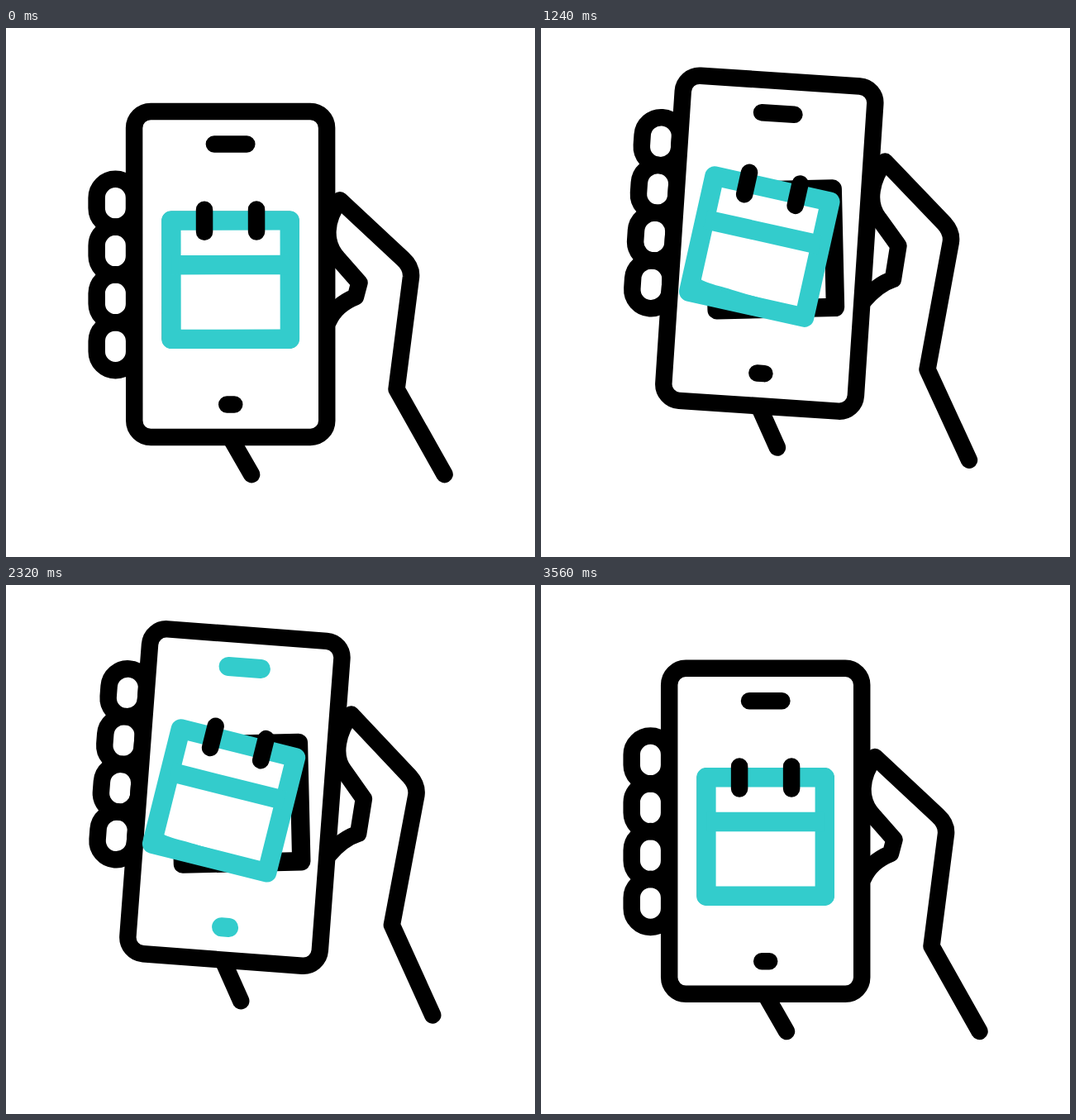
An HTML page without scripts that plays this animation: 640x640 px, repeating every 3.6 s.

```html
<!DOCTYPE html>
<html lang="en">
<head>
<meta charset="utf-8">
<title>Phone calendar</title>
<style>
/* --s: 0 at rest, 1 while swinging; --p: 0 at the left tilt, 1 at the right tilt */
@property --s { syntax: "<number>"; inherits: true; initial-value: 0; }
@property --p { syntax: "<number>"; inherits: true; initial-value: 0; }

html, body { margin: 0; width: 100%; height: 100%; overflow: hidden; background: #fff; }
svg { display: block; width: 100%; height: 100%; animation: settle 3.6s var(--soft) infinite, swing 3.6s var(--soft) infinite; }
:root { --soft: cubic-bezier(.333, 0, .667, 1); }

.line { fill: none; stroke: #000; stroke-width: 20.5; stroke-linecap: round; stroke-linejoin: round; }
.frame { fill: #fff; stroke: #3cc; stroke-width: 23.4; stroke-linejoin: round; }

/* left pose (x, y, a) plus the change towards the right pose (dx, dy, da) */
.pose {
  transform:
    translate(calc(var(--s) * (var(--x) + var(--p) * var(--dx)) * 1px),
              calc(var(--s) * (var(--y) + var(--p) * var(--dy)) * 1px))
    rotate(calc(var(--s) * (var(--a) + var(--p) * var(--da)) * 1deg));
}
#phone   { --x: -5.7;  --dx: 11.7; --y: 24.5; --dy: -70; --a: -5.1;  --da: 10.1; }
#fingers { --x: 0;     --dx: 0;    --y: 7;    --dy: -40; --a: 0;     --da: 0; }
#cal     { --x: 5;     --dx: -14;  --y: 23.5; --dy: -72; --a: -12.6; --da: 28.6; }
#back    { --x: -10.5; --dx: 24.5; --y: 25;   --dy: -70; --a: -.6;   --da: -.8; }

#back { stroke-width: 22.4; stroke: #000; fill: none; }
#curl { fill: #3cc; transform: scaleY(calc(var(--s) * (1 - var(--p)))); }
#corner { fill: #fff; transform: scale(max(0, var(--s) * (1 - 2 * var(--p)))); }
#arm { animation: arm 3.6s var(--soft) infinite; }
#pills { animation: pills 3.6s step-end infinite; }

@keyframes settle {
  0% { --s: 0; animation-timing-function: cubic-bezier(.2, .6, .2, 1); }
  15.56%, 81.9% { --s: 1; }
  98.9%, 100% { --s: 0; }
}
@keyframes swing {
  0%, 16.67%, 46.7%, 52.2%, 81.9%, 100% { --p: 0; }
  31.67%, 66.8% { --p: 1; animation-timing-function: cubic-bezier(.333, 0, .4, 1); }
}
@keyframes arm {
  0% {
    d: path("M270 493L297 540M530.5 540L472.5 437L490 301Q491 289 480 279L404 208C386 232 384 260 402 279L427.5 308L423 325C408 331 396 341 390 355");
    animation-timing-function: cubic-bezier(.2, .6, .2, 1);
  }
  15.56%, 16.67%, 46.7%, 52.2%, 81.9% {
    d: path("M282 515L314.5 581.5M547 561L478.5 443.5L486.5 336Q488 323 475.5 312.5L391.5 247C374 272 374 298 397 317L424.5 343.5L421.5 359.5C409 366 399 377 389 395");
  }
  31.67%, 66.8% {
    d: path("M262 452L282 497.5M514 517.5L466 409L497 249Q499 237 489.5 226L419.5 150C404 169 395.5 200 410.5 219L433.5 252.5L426.5 296.5C414.5 300 402.5 308 390 322");
    animation-timing-function: cubic-bezier(.333, 0, .4, 1);
  }
  98.9%, 100% {
    d: path("M270 493L297 540M530.5 540L472.5 437L490 301Q491 289 480 279L404 208C386 232 384 260 402 279L427.5 308L423 325C408 331 396 341 390 355");
  }
}
@keyframes pills {
  0%, 31.67%, 66.8%, 100% { stroke: #000; stroke-width: 20.5px; }
  17.2%, 48.6% { stroke: #3cc; stroke-width: 23px; }
}
</style>
</head>
<body>
<svg viewBox="0 0 640 640">
  <defs>
    <clipPath id="inner"><rect x="-62" y="-10" width="124" height="72"/></clipPath>
    <rect id="finger" x="-162" y="-115.5" width="45.5" height="58" rx="22.7"/>
    <rect id="square" x="-71.7" y="-71.7" width="143.4" height="143.4"/>
  </defs>

  <path id="arm" class="line"/>

  <g transform="translate(271.7 298)">
    <g id="phone" class="pose">
      <g id="fingers" class="line pose">
        <use href="#finger"/>
        <use href="#finger" y="57.8"/>
        <use href="#finger" y="115.6"/>
        <use href="#finger" y="173.4"/>
      </g>
      <rect class="line" style="fill: #fff" x="-116.5" y="-197.2" width="233" height="394" rx="20"/>
      <path id="pills" class="line" d="M-19.7 -157.7H19.7M-4.5 157.3H4.5"/>
    </g>
  </g>

  <g transform="translate(271.6 304.5)">
    <use id="back" class="frame pose" href="#square"/>
    <g id="cal" class="pose">
      <use class="frame" href="#square"/>
      <g clip-path="url(#inner)">
        <!-- page curl, shrinking towards the bottom left corner -->
        <g transform="translate(-62 62)">
          <path id="curl" d="M0 -75C2 -56 12 -43 26 -41C38 -40 62 -8 124 -2V0H0Z"/>
          <path id="corner" d="M0 -26L52 0H0Z"/>
        </g>
      </g>
      <path class="frame" d="M-71 -18H71"/>
      <path class="line" d="M-31.5 -85V-58M31.5 -85V-58"/>
    </g>
  </g>
</svg>
</body>
</html>
```
